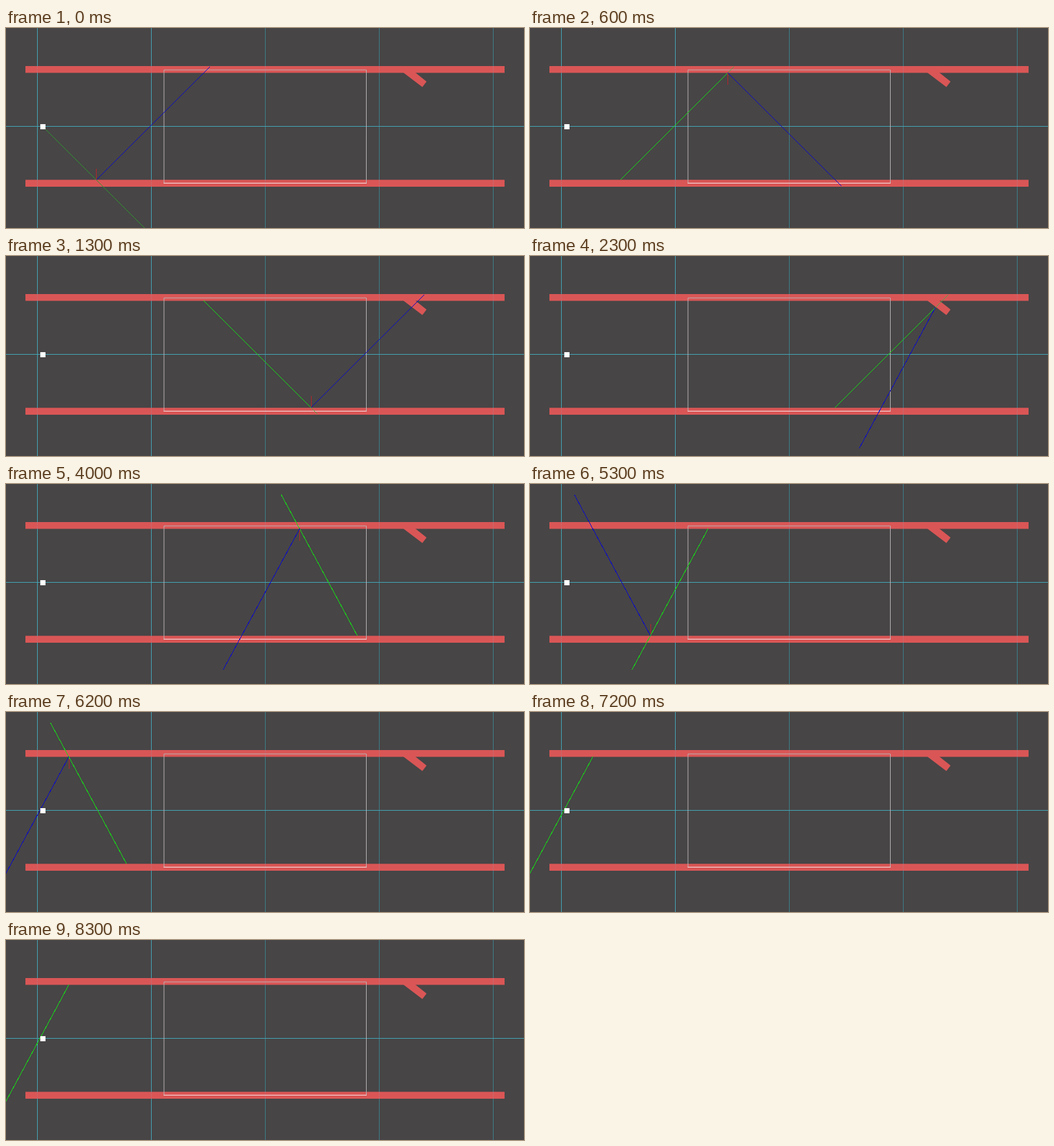
An HTML page for the animation above (8700 ms loop, 800 px wide and 310 px high).

```html
<!DOCTYPE html>
<html lang="en">
<head>
<meta charset="utf-8">
<title>Ray bouncing between walls</title>
<style>
html, body { margin: 0; width: 100%; height: 100%; overflow: hidden; background: #474546; }
svg { display: block; width: 800px; height: 310px; }
.grid { stroke: #3c7e89; }
.grid .axis { stroke: #43a5b5; }
.wall { fill: #da5656; }
.frame { stroke: #b9b2b3; fill: none; }
.ray { shape-rendering: crispEdges; }
</style>
</head>
<body>
<svg viewBox="0 0 800 310">
  <g class="grid">
    <path d="M400.5 0V310M576.5 0V310M752.5 0V310"/>
    <path class="axis" d="M48.5 0V310M224.5 0V310M0 152.5H800"/>
  </g>
  <g class="wall">
    <rect x="30" y="59" width="740" height="10.5"/>
    <rect x="30" y="235.3" width="740" height="10.7"/>
    <path d="M613.5 69H632L649.5 83L643 91.5Z"/>
  </g>
  <path d="M48.5 59V69M224.5 59V69M48.5 235V246M224.5 235V246M400.5 59V69M400.5 235V246M576.5 59V69M576.5 235V246M752.5 59V69M752.5 235V246" stroke="#b77880" opacity=".5"/>
  <path class="frame" d="M244 240.5V65H556.5V240.5"/>
  <path d="M243.5 240.5H557" stroke="#f4e4e4"/>
  <line class="ray" id="normal" stroke="#b4262b"/>
  <line class="ray" id="cast" stroke="#14dc14"/>
  <line class="ray" id="past" stroke="#3aa83a"/>
  <line class="ray" id="bounce" stroke="#0a0ac8"/>
  <rect x="53" y="149" width="8" height="8" fill="#fff"/>
</svg>
<script>
const LOOP = 8700, REACH = 248, NORMAL = 18;

// start point, then each hit, then the way out
const path = [
  [57, 153], [139.5, 235.5], [305.5, 69.5], [471, 235], [626, 80], [542.5, 235],
  [453.5, 69.5], [364, 235], [275, 69.5], [186, 235], [97, 69.5], [8, 235]
];
// time at which each cast from path[i] appears
const times = [0, 400, 1000, 2000, 3000, 4000, 4100, 4900, 5000, 6100, 7000];
const BLOCK = 4;

const [normal, cast, past, bounce] =
  ['normal', 'cast', 'past', 'bounce'].map(id => document.getElementById(id));

function setLine(el, a, b) {
  el.style.display = a ? '' : 'none';
  if (!a) return;
  [a[0], a[1], b[0], b[1]].forEach((v, i) =>
    el.setAttribute(['x1', 'y1', 'x2', 'y2'][i], v));
}

function reach(a, b) {
  const k = REACH / Math.hypot(b[0] - a[0], b[1] - a[1]);
  return [a[0] + (b[0] - a[0]) * k, a[1] + (b[1] - a[1]) * k];
}

function show(i) {
  const from = path[i], hit = path[i + 1], next = path[i + 2];
  const end = reach(from, hit);
  cast.setAttribute('stroke', i ? '#14dc14' : '#2e962e');
  past.setAttribute('stroke', i ? (i < 4 ? '#4fa845' : '#14dc14') : '#2e962e');
  if (!next) {
    setLine(cast, from, end);
    [past, bounce, normal].forEach(el => setLine(el));
    return;
  }
  setLine(cast, from, hit);
  setLine(past, hit, end);
  setLine(bounce, hit, reach(hit, next));
  if (i + 1 === BLOCK) setLine(normal);
  else setLine(normal, hit, [hit[0], hit[1] + (hit[1] > 150 ? -NORMAL : NORMAL)]);
}

let shown = -1;
const start = performance.now();
function tick() {
  const t = Math.max(0, performance.now() - start) % LOOP;
  const i = times.filter(s => s <= t).length - 1;
  if (i !== shown) show(shown = i);
  requestAnimationFrame(tick);
}
tick();
</script>
</body>
</html>
```
